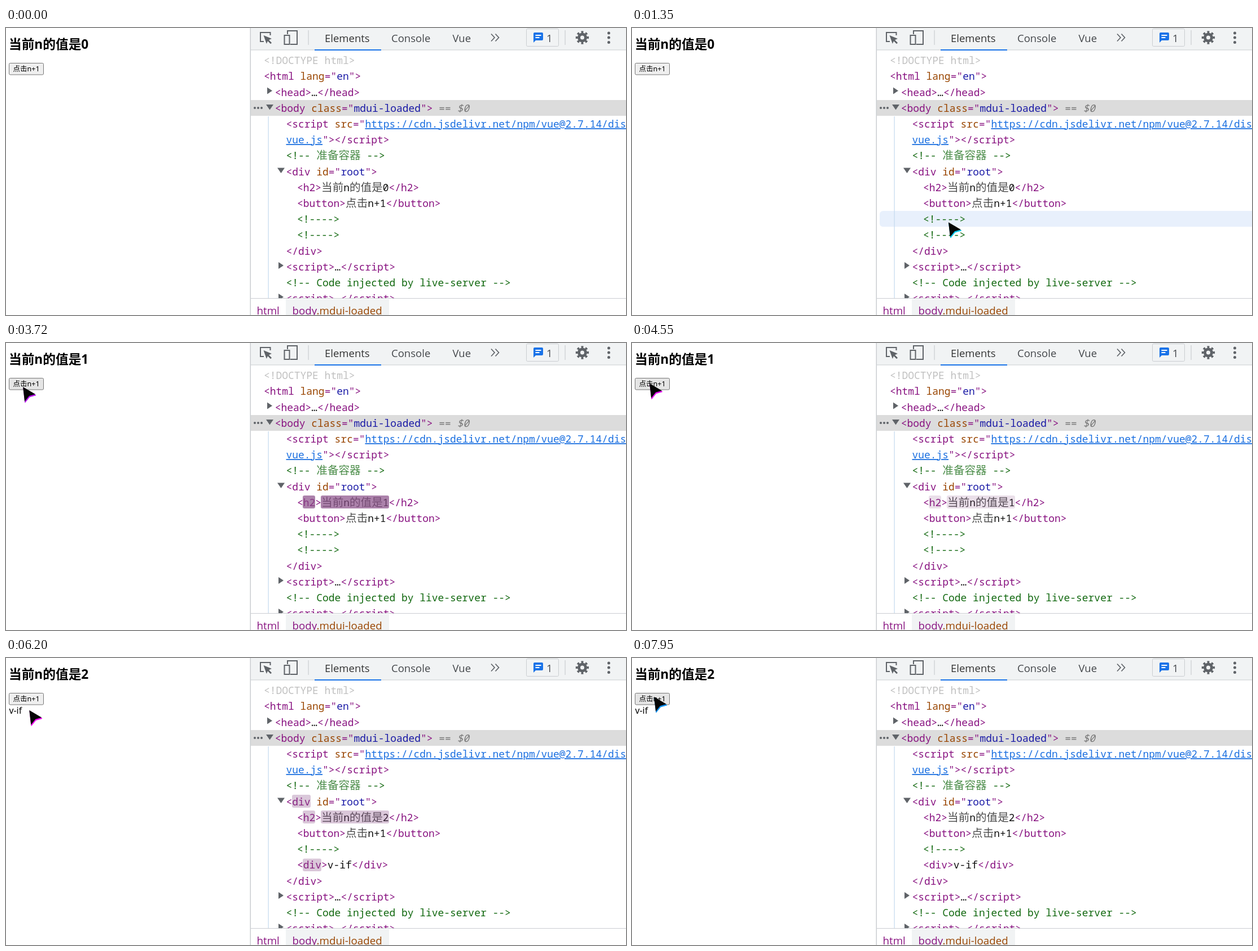
An HTML page for the animation above (8 s loop, 1099 by 510 pixels).

```html
<!DOCTYPE html>
<html lang="zh">
<head>
<meta charset="utf-8">
<title>v-if demo</title>
<style>
html, body { margin: 0; width: 100%; height: 100%; overflow: hidden; background: #fff; }
svg { display: block; }
text { white-space: pre; }
.page { font-family: "Noto Sans", "Noto Sans CJK SC", "Noto Sans CJK", sans-serif; fill: #000; }
.ui { font: 18.5px "Open Sans", "Noto Sans", sans-serif; fill: #44474b; }
.crumbs { font-size: 18.75px; fill: #881280; }
.code { font: 17.95px "Noto Sans Mono", "DejaVu Sans Mono", monospace; fill: #881280; }
.attr { fill: #994500; }
.val { fill: #1a1aa6; }
.link { fill: #1a6fe0; text-decoration: underline; text-decoration-thickness: 1.5px; text-underline-offset: 2px; }
.note { fill: #11680f; }
.plain { fill: #111; }
.cjk { font-family: "Noto Sans CJK SC", "Noto Sans CJK", sans-serif; font-size: 19.6px; font-weight: 300; fill-opacity: .75; }
.icon { fill: none; stroke: #5f6368; stroke-width: 2; }
.solid { fill: #5f6368; }
.rule { fill: #cacdd1; }
.flash { fill: #884b86; opacity: 0; }
</style>
</head>
<body>
<svg width="1099" height="510" viewBox="0 0 1099 510">
  <defs>
    <clipPath id="treeClip"><rect x="434" y="40" width="665" height="440"/></clipPath>
    <path id="down" d="M0 0h13l-6.5 9.5z"/>
    <path id="right" d="M0 0v12l9-6z"/>
    <path id="arrow" d="M0 0L22 13L11 16L3 26Z" stroke-linejoin="round"/>
  </defs>

  <g class="page">
    <text x="5" y="37" font-size="22.7" font-weight="700">当前n的值是<tspan class="count">0</tspan></text>
    <rect id="button" x="5.5" y="62.5" width="61" height="20.5" rx="2" fill="#efefef" stroke="#767676"/>
    <text x="12.5" y="77.2" font-size="12.5">点击n+1</text>
    <text class="shown" x="5.5" y="99" font-size="15.8">v-if</text>
  </g>

  <rect class="rule" x="432.5" width="1.5" height="510"/>
  <rect x="434" width="665" height="39" fill="#f1f3f4"/>
  <rect class="rule" x="434" y="38.5" width="665" height="1"/>
  <g class="icon">
    <path d="M468.5 13V8H451v16h6"/>
    <path d="M499 11V5h17v24h-12"/>
    <rect x="493.5" y="13" width="9" height="16"/>
    <path d="M860 10.5l6 6.5-6 6.5M867.5 10.5l6 6.5-6 6.5" stroke-width="1.7"/>
    <circle cx="1021.5" cy="17" r="6" stroke-width="5"/>
    <circle cx="1021.5" cy="17" r="9.7" stroke-width="4" pathLength="16" stroke-dasharray="1" stroke-dashoffset=".5"/>
  </g>
  <g class="solid">
    <path d="M456.5 13l14.5 6-5 2.2 5 5-2 2-5-5-2.2 4.8z"/>
    <circle cx="1068.5" cy="9" r="2.5"/><circle cx="1068.5" cy="17" r="2.5"/><circle cx="1068.5" cy="25.5" r="2.5"/>
  </g>
  <rect class="rule" x="535.5" y="4" width="1.2" height="26"/>
  <rect class="rule" x="990.5" y="4" width="1.2" height="26"/>
  <rect x="922.5" y="1.5" width="57" height="31" rx="2" fill="#f1f3f4" stroke="#cacdd1"/>
  <path d="M937 8h13q2 0 2 2v10q0 2-2 2h-11l-4 4V10q0-2 2-2z" fill="#1a73e8"/>
  <path d="M938.5 13h10M938.5 17h7" stroke="#fff" stroke-width="1.8"/>
  <g class="ui">
    <text x="565" y="25" fill="#333">Elements</text>
    <text x="683" y="25">Console</text>
    <text x="791.5" y="25">Vue</text>
    <text x="958" y="25">1</text>
  </g>
  <rect x="547" y="38" width="118" height="2" fill="#1a73e8"/>

  <g clip-path="url(#treeClip)">
    <rect x="434" y="128" width="665" height="28" fill="#dcdcdc"/>
    <rect id="hover" x="439" width="680" height="28.2" rx="6" fill="#e8f0fc"/>
    <rect x="464.5" y="157" width="1.2" height="323" fill="#c4d9ee"/>
    <g class="solid">
      <circle cx="441" cy="142" r="2"/><circle cx="447" cy="142" r="2"/><circle cx="453" cy="142" r="2"/>
      <use href="#right" x="463" y="105.5"/>
      <use href="#down" x="461" y="136"/>
      <use href="#down" x="481" y="248.5"/>
      <use href="#right" x="483" y="416"/>
      <use href="#right" x="483" y="472"/>
    </g>
    <g class="code" id="tree">
      <text x="457" fill="#c0c0c0">&lt;!DOCTYPE html&gt;</text>
      <text x="457">&lt;html <tspan class="attr">lang</tspan>="<tspan class="val">en</tspan>"&gt;</text>
      <text x="476.7">&lt;head&gt;<tspan class="plain">…</tspan>&lt;/head&gt;</text>
      <text x="476.7">&lt;body <tspan class="attr">class</tspan>="<tspan class="val">mdui-loaded</tspan>"&gt;<tspan fill="#777"> == <tspan font-style="italic">$0</tspan></tspan></text>
      <text x="496.5">&lt;script <tspan class="attr">src</tspan>="<tspan class="link">https://cdn.jsdelivr.net/npm/vue@2.7.14/dis</tspan></text>
      <text x="496.5"><tspan class="link">vue.js</tspan>"&gt;&lt;/script&gt;</text>
      <text x="496.5" class="note">&lt;!-- <tspan class="cjk">准备容器</tspan> --&gt;</text>
      <text x="496.5">&lt;div <tspan class="attr">id</tspan>="<tspan class="val">root</tspan>"&gt;</text>
      <text x="516">&lt;h2&gt;<tspan class="plain"><tspan class="cjk">当前</tspan>n<tspan class="cjk">的值是</tspan><tspan class="count">0</tspan></tspan>&lt;/h2&gt;</text>
      <text x="516">&lt;button&gt;<tspan class="plain"><tspan class="cjk">点击</tspan>n+1</tspan>&lt;/button&gt;</text>
      <text x="516" class="note">&lt;!----&gt;</text>
      <text x="516"><tspan class="note absent">&lt;!----&gt;</tspan><tspan class="shown">&lt;div&gt;<tspan class="plain">v-if</tspan>&lt;/div&gt;</tspan></text>
      <text x="496.5">&lt;/div&gt;</text>
      <text x="496.5">&lt;script&gt;<tspan class="plain">…</tspan>&lt;/script&gt;</text>
      <text x="496.5" class="note">&lt;!-- Code injected by live-server --&gt;</text>
      <text x="496.5">&lt;script&gt;<tspan class="plain">…</tspan>&lt;/script&gt;</text>
    </g>
    <g class="flash" id="textFlash">
      <rect x="526" y="271" width="22" height="23" rx="3"/>
      <rect x="558" y="271" width="121" height="23" rx="3"/>
    </g>
    <g class="flash" id="nodeFlash">
      <rect x="507" y="243" width="33" height="23" rx="3"/>
      <rect x="526" y="356.5" width="33" height="22.5" rx="3"/>
    </g>
  </g>

  <rect class="rule" x="434" y="480" width="665" height="1"/>
  <rect x="496" y="482" width="183" height="28" fill="#f1f3f4"/>
  <g class="ui crumbs">
    <text x="444.5" y="508.5">html</text>
    <text x="507.5" y="508.5">body<tspan class="attr">.mdui-loaded</tspan></text>
  </g>

  <g id="cursor">
    <use id="glow" href="#arrow" x=".8" y="1.8" stroke-width="1"/>
    <use href="#arrow" fill="#050505"/>
  </g>
</svg>
<script>
const LOOP = 8000, START = 390, TICK = 69.35;
const ROW = 28.2, FIRST_ROW = 58;
const FIRST_CLICK = 3430, SECOND_CLICK = 5310, FLASH = 1400;

// time, x, y of the pointer tip
const path = [
  [390, 2, 14], [600, 180, 300], [780, 445, 452], [920, 490, 412], [1080, 545, 382],
  [1210, 556, 364], [1290, 560, 349], [1365, 561, 345], [1700, 572, 340], [2040, 560, 351],
  [2250, 470, 330], [2330, 438, 315], [2580, 170, 190], [2760, 32, 80], [3300, 34, 76],
  [3725, 30, 78], [4500, 31, 72], [5450, 32, 68], [6180, 35, 75], [6390, 72, 180],
  [6620, 133, 308], [6850, 320, 440], [6975, 362, 472], [7110, 385, 468], [7260, 475, 455],
  [7400, 415, 440], [7550, 235, 320], [7680, 125, 205], [7760, 65, 135], [7870, 43, 76], [7950, 39, 69]
];
const hues = [[390, 120], [1365, 190], [2330, 345], [3725, 285], [5450, 310], [6975, 290], [7950, 205]];

const byId = id => document.getElementById(id);
const each = (selector, fn) => document.querySelectorAll(selector).forEach(fn);

function sample(track, t) {
  const i = track.findIndex(key => key[0] > t);
  if (i === 0) return track[0].slice(1);
  if (i < 0) return track[track.length - 1].slice(1);
  const from = track[i - 1], to = track[i];
  const p = (t - from[0]) / (to[0] - from[0]);
  return from.slice(1).map((v, k) => v + (to[k + 1] - v) * p);
}

function flashLevel(t, start) {
  const age = (t - start) / FLASH;
  return age >= 0 && age < 1 ? 0.87 * (1 - age) : 0;
}

function show(el, visible) { el.style.display = visible ? "" : "none"; }

function render(t) {
  const active = t >= START;
  if (active) t = START + Math.floor((t - START + 15) / TICK) * TICK;

  const [x, y] = sample(path, t);
  show(byId("cursor"), active);
  byId("cursor").setAttribute("transform", `translate(${x} ${y})`);
  const color = `hsl(${sample(hues, t)[0]} 95% 48%)`;
  byId("glow").style.fill = byId("glow").style.stroke = color;

  // row hover trails the pointer by one tick
  const [hx, hy] = sample(path, t - TICK);
  const row = Math.round((hy - FIRST_ROW) / ROW);
  show(byId("hover"), active && hx > 439 && row >= 0);
  byId("hover").setAttribute("y", FIRST_ROW + (row - 0.5) * ROW - 0.9);

  const onButton = active && x > 5 && x < 67 && y > 62 && y < 84;
  byId("button").setAttribute("fill", onButton ? "#e5e5e5" : "#efefef");

  const count = t >= SECOND_CLICK ? 2 : t >= FIRST_CLICK ? 1 : 0;
  each(".count", el => { el.textContent = count; });
  each(".shown", el => show(el, count === 2));
  each(".absent", el => show(el, count < 2));
  byId("nodeFlash").style.opacity = flashLevel(t, SECOND_CLICK);
  byId("textFlash").style.opacity = flashLevel(t, count === 2 ? SECOND_CLICK : FIRST_CLICK);
}

[...byId("tree").children].forEach((el, i) => el.setAttribute("y", FIRST_ROW + i * ROW + 6.2));

const origin = performance.now();
function loop() {
  render((performance.now() - origin) % LOOP);
  requestAnimationFrame(loop);
}
loop();
</script>
</body>
</html>
```
